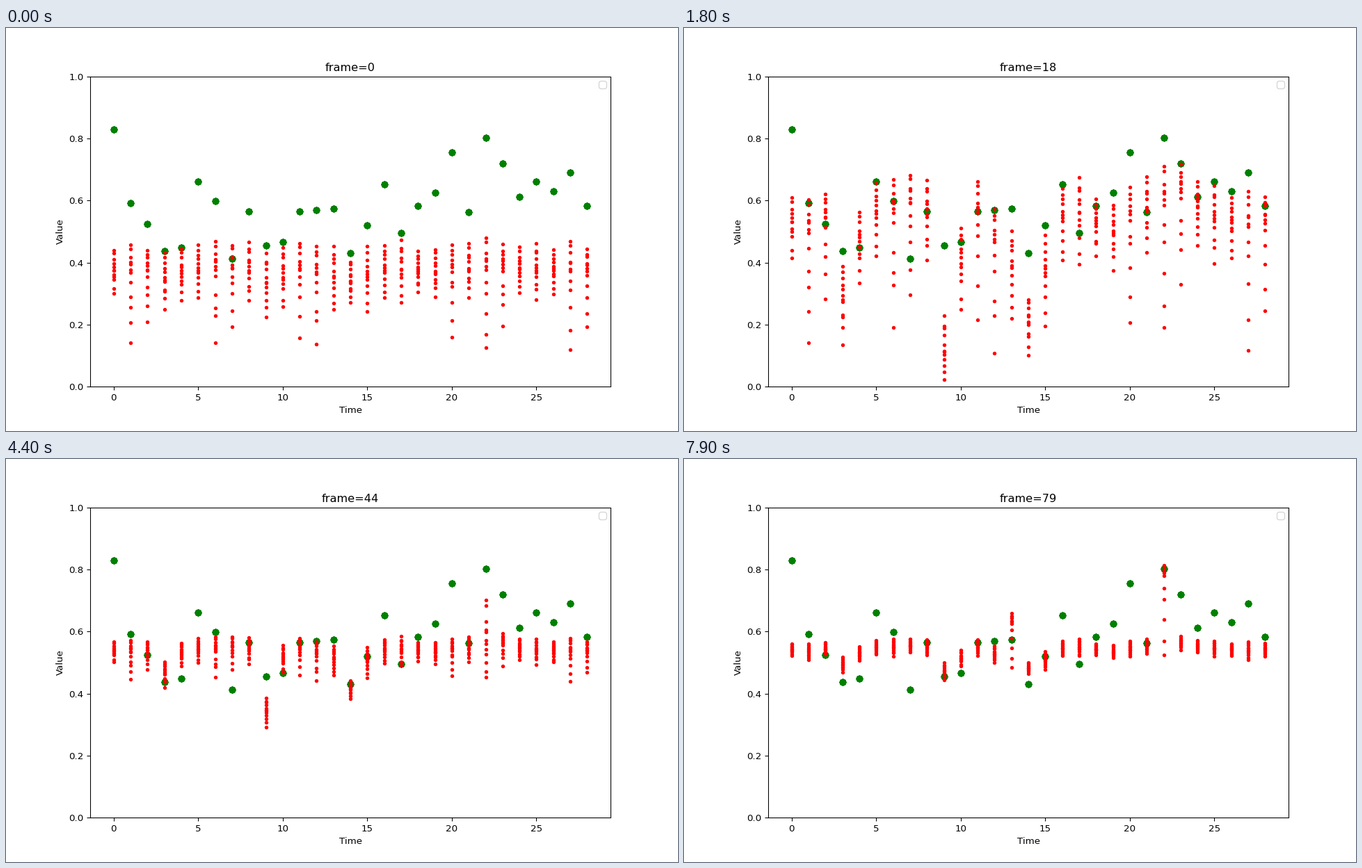
A matplotlib script that plays this animation: 966 px wide and 580 px high, repeating every 8000 ms.

```python
import numpy as np
import matplotlib.pyplot as plt
from matplotlib.animation import FuncAnimation

STEPS = 80
DOTS = 12
COLS = 29
x = np.arange(COLS)

truth = np.array([829, 591, 524, 437, 448, 662, 599, 413, 565, 455,
                  467, 565, 569, 574, 431, 520, 651, 496, 582, 625,
                  755, 563, 801, 720, 612, 662, 630, 690, 582]) / 1000

# How far each column swings away from the common level.
lean = np.array([2, 0, 3, -12, -2, 4, 4, 6, 4, -18,
                 -6, 4, -2, -7, -15, -8, 3, 4, 2, 0,
                 3, 5, 6, 8, 5, 3, 2, 1, 2]) / 10

# Columns with a long lower tail.
tailed = np.isin(x, [1, 2, 6, 7, 11, 12, 20, 22, 23, 27, 28])

# step, level, linear swing, cubic swing, reach up, reach down, tail
KEYS = np.array([
    [0, 0.370, 0.020, 0.000, 0.080, 0.090, 0.210],
    [8, 0.600, 0.250, 0.000, 0.160, 0.220, 0.500],
    [18, 0.500, 0.150, 0.020, 0.095, 0.140, 0.330],
    [35, 0.545, 0.000, 0.070, 0.035, 0.060, 0.150],
    [54, 0.527, 0.030, 0.000, 0.034, 0.033, 0.037],
    [79, 0.535, 0.035, 0.000, 0.023, 0.023, 0.025],
])

# Columns that leave the rest late: column, rise, first step, last step
CLIMBS = [(22, 0.23, 35, 75), (13, 0.12, 54, 68)]

# Each dot keeps its rank within the column, from -1 (low) to 1 (high).
rng = np.random.default_rng(4)
rank = np.linspace(-1, 1, DOTS)[:, None] + rng.uniform(-0.08, 0.08, (DOTS, COLS))
rank[0], rank[-1] = -1, 1
width = rng.uniform(0.75, 1.25, COLS)


def params(step):
    """Ease out from one key to the next."""
    f, k = np.modf(np.interp(step, KEYS[:, 0], np.arange(len(KEYS))))
    a, b = KEYS[int(k)], KEYS[min(int(k) + 1, len(KEYS) - 1)]
    return (a + (b - a) * (1 - (1 - f) ** 1.5))[1:]


def values(step):
    level, linear, cubic, up, down, tail = params(step)
    mid = level + linear * lean + cubic * lean ** 3
    high = mid + up * width
    low = mid - np.minimum(np.where(tailed, tail, down) * width, 0.8 * mid)
    for col, rise, first, last in CLIMBS:
        f = np.clip((step - first) / (last - first), 0, 1)
        mid[col] += rise * f ** 2
        high[col] += rise * f ** 0.5
    size = np.abs(rank)
    return np.where(rank < 0,
                    mid - (mid - low) * size ** 1.6,
                    mid + (high - mid) * size ** 1.2)


# 966 x 580 pixels
fig, ax = plt.subplots(figsize=(10, 6.00415), dpi=96.6)
ax.set(xlim=(-1.4, 29.4), ylim=(0, 1), xlabel="Time", ylabel="Value")
for _ in range(DOTS):
    ax.plot(x, truth, "go")
dots, = ax.plot([], [], "r.")
ax.legend([], [], loc="upper right")
title = ax.set_title("frame=0")


def draw(step):
    dots.set_data(np.tile(x, DOTS), values(step).ravel())
    title.set_text(f"frame={step}")
    return dots, title


anim = FuncAnimation(fig, draw, frames=STEPS, interval=100, repeat=True, repeat_delay=0)
plt.show()
```
